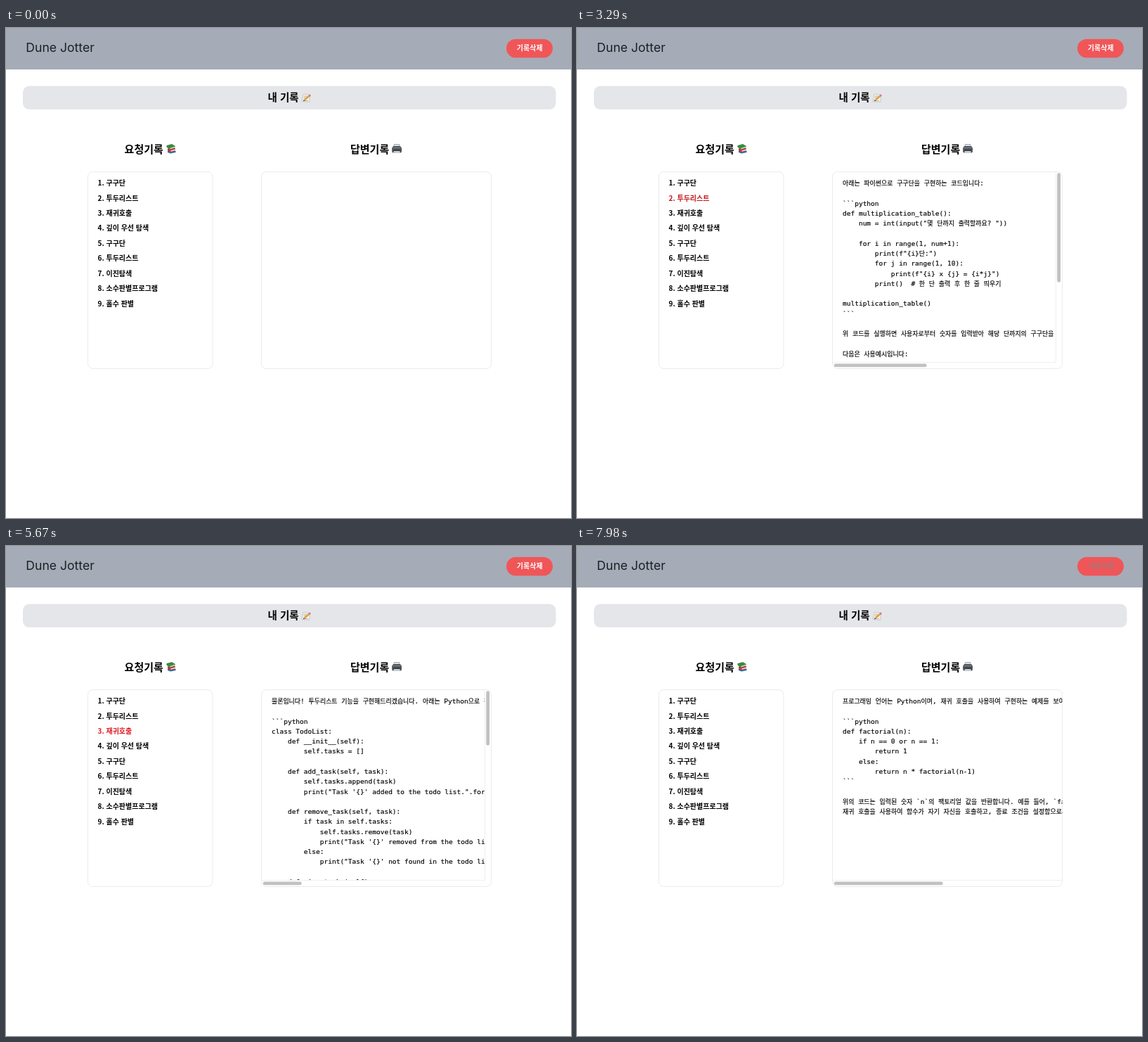
Recreate the animation shown at these times as an HTML page. Size 804 by 697 pixels, loop 8000 ms.

```html
<!DOCTYPE html>
<html lang="ko">
<head>
<meta charset="utf-8">
<title>내 기록</title>
<style>
  html, body { margin: 0; width: 100%; height: 100%; overflow: hidden; background: #fff; }
  svg { display: block; }
  text { white-space: pre; font-family: "Noto Sans CJK KR", "Noto Sans CJK", sans-serif; }
  .title { font: 400 17.6px Inter, sans-serif; fill: #1d1f23; }
  .head { font-size: 15px; font-weight: 700; fill: #000; }
  .row { font-size: 10px; font-weight: 700; }
  .code { font-family: "DejaVu Sans Mono", monospace; font-size: 9.52px; fill: #000; stroke: #000; stroke-width: .15px; }
  .code tspan { font-family: "Noto Sans CJK KR", "Noto Sans CJK", sans-serif; font-size: 8.94px; }
  .box { fill: #fff; stroke: #e9ebee; }
  .rule { stroke: #eeeff1; }
  .thumb { fill: #c1c1c1; }
</style>
</head>
<body>
<svg id="stage" width="804" height="697" viewBox="0 0 804 697">
  <clipPath id="both"><rect x="364" y="205" width="318" height="270.5"/></clipPath>
  <clipPath id="wide"><rect x="364" y="205" width="326.5" height="270.5"/></clipPath>

  <rect width="804" height="59" fill="#a5acb8"/>
  <text class="title" x="28.3" y="34.3">Dune Jotter</text>
  <rect x="712" y="15.7" width="66" height="26.6" rx="13.3" fill="#f05658"/>
  <text id="button" x="726.8" y="32.1" font-size="10" font-weight="700">기록삭제</text>

  <rect x="24" y="82.5" width="758.5" height="33.3" rx="9" fill="#e5e6ea"/>
  <text class="head" x="372.6" y="104" style="font-size:14.5px">내 기록</text>
  <text class="head" x="168.6" y="177.5">요청기록</text>
  <text class="head" x="490" y="177.5">답변기록</text>

  <!-- memo -->
  <g transform="translate(420 92.5)">
    <path d="M3 1.5 13 2.5 11.5 13 1 12Z" fill="#f4f3ec" stroke="#b9babd" stroke-width=".7"/>
    <path d="M3.8 4.5h5M3.6 6.5h4M5 11h5" stroke="#a3a8b0" stroke-width=".8"/>
    <path d="M4.4 10.3 11.6 4" stroke="#e3a136" stroke-width="2.5"/>
    <path d="M11.2 4.4 13 2.8" stroke="#d9737a" stroke-width="2.5"/>
    <path d="M3 11.8 3.6 9.5 5.3 11.3Z" fill="#4a3a2c"/>
  </g>
  <!-- books -->
  <g transform="translate(228 164.5)">
    <path d="M2 10.5 9 9l4.5 1.5v2L6 14 2 12.5Z" fill="#356ea3"/>
    <path d="M2 7 9 5.5 13 7v3L6.5 12 2 10Z" fill="#c8323a"/>
    <path d="M6.5 9.8 13 8v1.4l-6.5 1.8Z" fill="#f1ece2"/>
    <path d="M.5 2.5 8 .5l5 3v2.3L5.5 8.5.5 5Z" fill="#3b8a45"/>
    <path d="M5.5 6.4 13 4.1v1.2L5.5 7.8Z" fill="#f1ece2"/>
  </g>
  <!-- printer -->
  <g transform="translate(549 164.5)">
    <path d="M3.2 1h7.8v4H3.2Z" fill="#d9dde1" stroke="#7d848b" stroke-width=".6"/>
    <path d="M2.2 3.5h9.8l2 2.5v5.5l-1.2 1.5H1.4L.2 11.5V6Z" fill="#4d5359"/>
    <path d="M1.5 6h11.2" stroke="#858c93"/>
    <path d="M3 10h8.2l.8 3.5H2.2Z" fill="#c9ced3"/>
    <path d="M2.4 9.7h9.4" stroke="#24282c" stroke-width="1.2"/>
  </g>

  <rect class="box" x="116.5" y="204.5" width="177.5" height="280" rx="7"/>
  <rect class="box" x="363.5" y="204.5" width="327" height="280" rx="7"/>
</svg>
<script>
const LOOP = 8000;
const stage = document.getElementById("stage");
const button = document.getElementById("button");

const requests = ["구구단", "투두리스트", "재귀호출", "깊이 우선 탐색", "구구단",
  "투두리스트", "이진탐색", "소수판별프로그램", "홀수 판별"];

// h and v are scrollbar thumb lengths
const answers = [
  { h: 132, v: 155.5, text: `아래는 파이썬으로 구구단을 구현하는 코드입니다:

\`\`\`python
def multiplication_table():
    num = int(input("몇 단까지 출력할까요? "))

    for i in range(1, num+1):
        print(f"{i}단:")
        for j in range(1, 10):
            print(f"{i} x {j} = {i*j}")
        print()  # 한 단 출력 후 한 줄 띄우기

multiplication_table()
\`\`\`

위 코드를 실행하면 사용자로부터 숫자를 입력받아 해당 단까지의 구구단을 출력합니다.

다음은 사용예시입니다:` },
  { h: 55, v: 77.5, text: `물론입니다! 투두리스트 기능을 구현해드리겠습니다. 아래는 Python으로 작성한 코드입니다:

\`\`\`python
class TodoList:
    def __init__(self):
        self.tasks = []

    def add_task(self, task):
        self.tasks.append(task)
        print("Task '{}' added to the todo list.".format(task))

    def remove_task(self, task):
        if task in self.tasks:
            self.tasks.remove(task)
            print("Task '{}' removed from the todo list.".format(task))
        else:
            print("Task '{}' not found in the todo list.".format(task))

    def view_tasks(self):` },
  { h: 155, v: 0, text: `프로그래밍 언어는 Python이며, 재귀 호출을 사용하여 구현하는 예제를 보여드리겠습니다.

\`\`\`python
def factorial(n):
    if n == 0 or n == 1:
        return 1
    else:
        return n * factorial(n-1)
\`\`\`

위의 코드는 입력된 숫자 \`n\`의 팩토리얼 값을 반환합니다. 예를 들어, \`factorial(5)\`
재귀 호출을 사용하여 함수가 자기 자신을 호출하고, 종료 조건을 설정함으로써` }
];

const reds = ["#c9191f", "#c4171d", "#e01a22"];

// [start, hovered row, shown answer, button text colour]
const steps = [
  [0, -1, -1, "#fff"],
  [1470, 0, -1, "#fff"],
  [2030, 0, 0, "#fff"],
  [3220, -1, 0, "#fff"],
  [3290, 1, 0, "#fff"],
  [4410, 1, 1, "#fff"],
  [5530, -1, 1, "#fff"],
  [5670, 2, 1, "#fff"],
  [6230, 2, 2, "#fff"],
  [7560, -1, 2, "#fff"],
  [7910, -1, 2, "#d3b4b7"],
  [7980, -1, 2, "#a5757a"]
];

function add(parent, tag, attrs) {
  const el = document.createElementNS("http://www.w3.org/2000/svg", tag);
  for (const key in attrs) el.setAttribute(key, attrs[key]);
  return parent.appendChild(el);
}

const rows = requests.map((name, i) => {
  const row = add(stage, "text", { class: "row", x: 130.5, y: 224.2 + i * 21.43 });
  row.textContent = `${i + 1}. ${name}`;
  return row;
});

function addLine(parent, line, i) {
  const el = add(parent, "text", { class: "code", x: 378, y: 224 + i * 14.28 });
  for (const part of line.split(/([가-힣]+)/)) {
    if (/[가-힣]/.test(part)) add(el, "tspan", {}).textContent = part;
    else el.append(part);
  }
}

const panels = answers.map(({ h, v, text }) => {
  const panel = add(stage, "g", {});
  const body = add(panel, "g", { "clip-path": v ? "url(#both)" : "url(#wide)" });
  text.split("\n").forEach((line, i) => line && addLine(body, line, i));
  add(panel, "path", { class: "rule", fill: "none", d: v ? "M364 475.5H681.5V205" : "M364 475.5H690" });
  add(panel, "rect", { class: "thumb", x: 365.7, y: 477.5, width: h, height: 4.8, rx: 2.4 });
  if (v) add(panel, "rect", { class: "thumb", x: 683.3, y: 206.3, width: 4.8, height: v, rx: 2.4 });
  return panel;
});

let shown = null;
function draw() {
  const t = performance.now() % LOOP;
  const step = steps.findLast(s => s[0] <= t);
  if (step !== shown) {
    const [, hover, answer, ink] = shown = step;
    rows.forEach((row, i) => row.setAttribute("fill", i === hover ? reds[i] : "#000"));
    panels.forEach((panel, i) => panel.setAttribute("visibility", i === answer ? "visible" : "hidden"));
    button.setAttribute("fill", ink);
  }
  requestAnimationFrame(draw);
}
draw();
</script>
</body>
</html>
```
